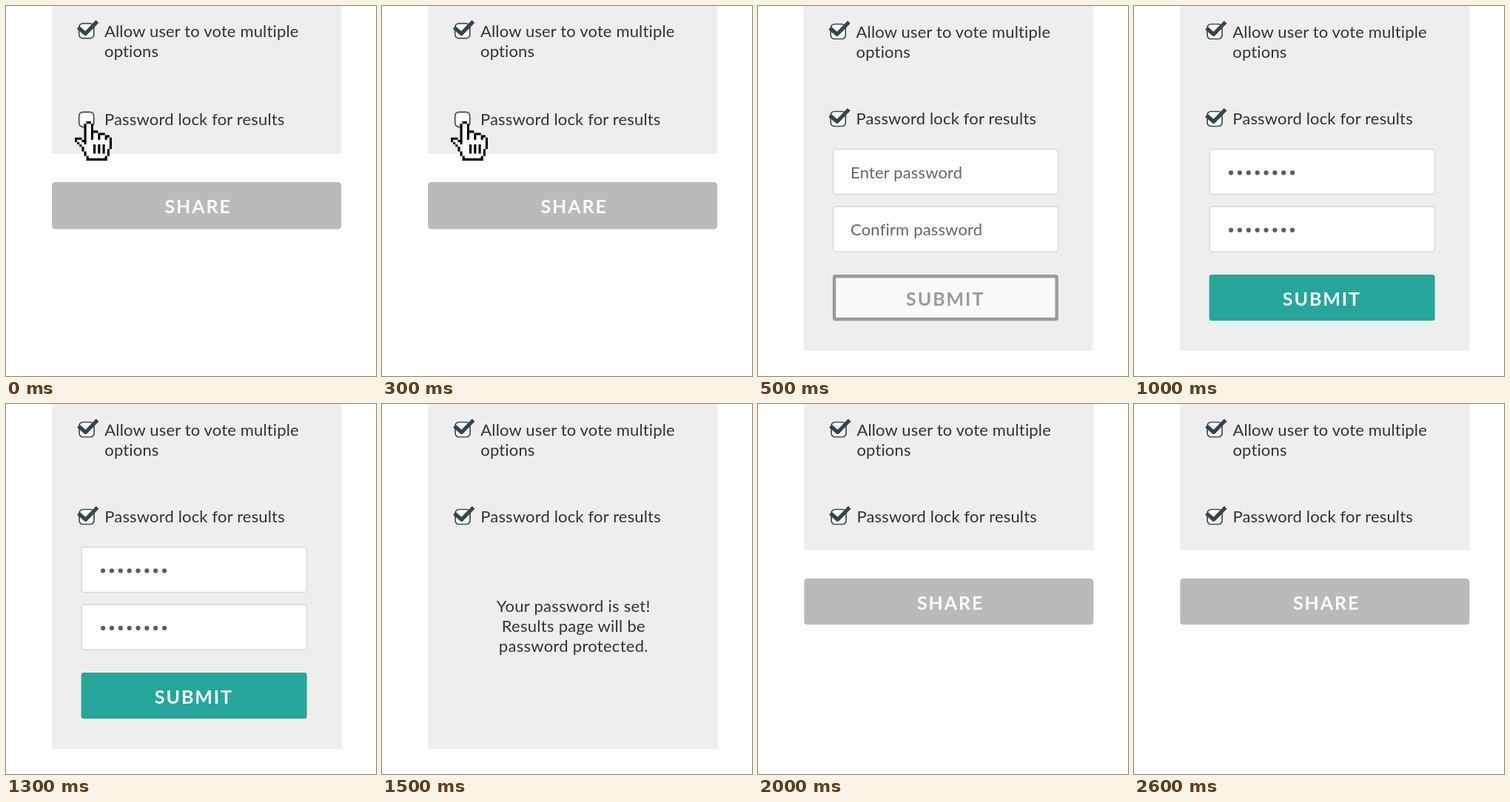
Animation, 500 px wide and 500 px high, one loop 3 s. Source, as an HTML page:

```html
<!DOCTYPE html>
<html lang="en">
<head>
<meta charset="utf-8">
<title>Password lock form</title>
<style>
  html, body { margin: 0; width: 100%; height: 100%; overflow: hidden; background: #fff; }
  svg { display: block; width: 100%; height: 100%; }
  text { font: 400 22px Lato, "Open Sans", sans-serif; letter-spacing: .16px; fill: #333; }
  .hint { fill: #666; }
  .mid { text-anchor: middle; letter-spacing: .28px; }
  .caps { font-weight: 700; font-size: 25px; letter-spacing: 1.9px; fill: #fff; }
  .off { fill: #9b9b9b; }
  .box { fill: #fff; stroke: #3b4c57; stroke-width: 1.7; }
  .tick { fill: none; stroke: #34454f; stroke-width: 5.2; stroke-linejoin: round; }
  .field { fill: #fff; stroke: #d6d6d6; stroke-width: 1.3; }
</style>
</head>
<body>
<svg id="stage" viewBox="0 0 500 500"></svg>
<script>
const LOOP = 3000;
const stage = document.getElementById("stage");

const text = (x, y, str, cls = "") => `<text x="${x}" y="${y}" class="${cls}">${str}</text>`;
const rect = (x, y, w, h, r, attrs) =>
  `<rect x="${x}" y="${y}" width="${w}" height="${h}" rx="${r}" ${attrs}/>`;
const shift = (dx, dy, body) => `<g transform="translate(${dx} ${dy})">${body}</g>`;

const panel = bottom => rect(62, -5, 391, bottom + 5, 0, 'fill="#eee"');

const checkbox = (y, on) =>
  rect(98.7, y, 20, 20, 5, 'class="box"') +
  (on ? `<path class="tick" d="M97.5 ${y + 5.2}L107.3 ${y + 13.8}L123.3 ${y - 2.8}"/>` : "");

const votes = () => checkbox(24.5, true) +
  text(133, 43.2, "Allow user to vote multiple") +
  text(133, 70.2, "options");

const lock = on => checkbox(142.5, on) + text(133, 160, "Password lock for results");

const options = () => votes() + lock(true);

const share = (y, h) =>
  rect(62, y, 391, h, 4.5, 'fill="#bababa"') + text(214.5, y + 42, "SHARE", "caps");

const fields = () => [193.7, 271].map(y => rect(102, y, 304, 60.8, 3.5, 'class="field"')).join("");

const dots = y => Array.from({ length: 8 }, (_, i) =>
  `<circle cx="${130.8 + i * 11.85}" cy="${y}" r="3.1" fill="#5c5c5c"/>`).join("");

const hand = () => `<g transform="translate(93 155.8) scale(3.125)">
  <path d="M5 0h2v1h1v3h2v1h3v1h2v1h1v5h-1v3h-1v2h-9v-2h-1v-2h-1v-2h-1v-1h-1v-1h-1v-2h3v1h1v-7h1z"/>
  <path fill="#fff" d="M5 1h2v7h1v-3h2v3h1v-2h2v2h1v-1h1v5h-1v3h-1v1h-7v-1h-1v-2h-1v-2h-1v-1h-1v-1h-1v-1h2v1h1v1h1z"/>
  <path d="M8 10h1v4h-1zM10 10h1v4h-1zM12 10h1v4h-1z"/></g>`;

const scenes = [
  { at: 0, draw: () => panel(199.5) + shift(0, -.8, votes()) + shift(0, .8, lock(false)) +
      share(238, 63.5) + hand() },
  { at: 500, draw: () => shift(-.4, 0, panel(466) + options() + fields() +
      text(125.5, 232.5, "Enter password", "hint") +
      text(125.5, 310, "Confirm password", "hint") +
      rect(103.5, 365.2, 300.6, 58, 1.5, 'fill="#fafafa" stroke="#9b9b9b" stroke-width="4.4"') +
      text(200.5, 404.5, "SUBMIT", "caps off")) },
  { at: 1000, draw: () => shift(.3, 0, panel(466) + options() + fields() +
      dots(225.3) + dots(302.8) +
      rect(101.3, 363, 305, 62.3, 3.5, 'fill="#26a69a"') +
      text(200.5, 404.5, "SUBMIT", "caps")) },
  { at: 1500, draw: () => shift(.3, 0, panel(466) + options() +
      text(258.5, 280.7, "Your password is set!", "mid") +
      text(258.5, 307.7, "Results page will be", "mid") +
      text(258.5, 334.7, "password protected.", "mid")) },
  { at: 2000, draw: () => shift(.4, 0, panel(197.7) + options() + share(235.8, 62.5)) }
];

let shown = null;
function render(ms) {
  const t = ms % LOOP;
  const scene = scenes.filter(s => s.at <= t).pop();
  if (scene === shown) return;
  shown = scene;
  stage.innerHTML = scene.draw();
}

const start = performance.now();
function tick() {
  render(performance.now() - start);
  requestAnimationFrame(tick);
}
tick();
</script>
</body>
</html>
```
